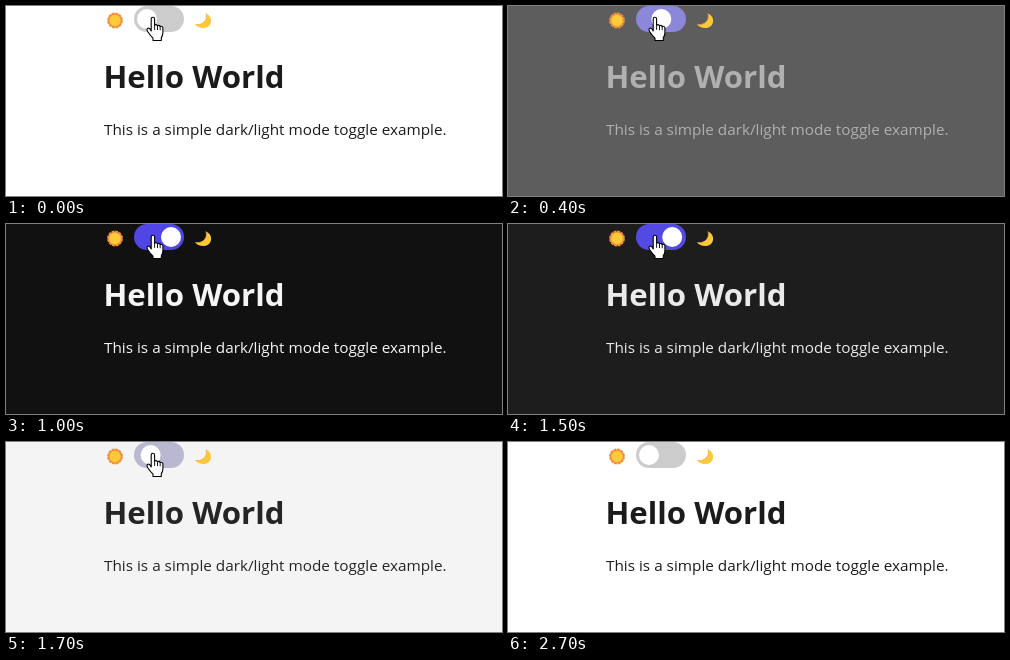
An HTML page that plays this animation: 496 by 190 pixels, repeating every 2800 ms.

```html
<!DOCTYPE html>
<html lang="en">
<head>
<meta charset="utf-8">
<title>Dark/light toggle</title>
<style>
  html, body { margin: 0; width: 100%; height: 100%; overflow: hidden; }
  svg { display: block; font-family: "Open Sans", "Noto Sans", sans-serif; }
</style>
</head>
<body>
<svg id="stage" width="496" height="190" viewBox="0 0 496 190">
  <rect id="page" width="496" height="190"/>

  <g transform="translate(109 14.5)">
    <circle r="7.1" fill="#f0903f"/>
    <circle r="7" fill="none" stroke="#f0903f" stroke-width="1.8" stroke-dasharray="2.9 .765"/>
    <circle r="5.7" fill="#fdcb3a"/>
  </g>

  <rect id="track" x="128" width="50" height="26" rx="13"/>
  <circle id="knob" cy="13" r="10" fill="#fff"/>

  <path d="M200 7.5C206.5 10 206.5 18 202 20.8C198 23.2 191.5 22 189.3 18.6C197 19.5 202 14 200 7.5Z" fill="#fdc83a"/>
  <path d="M189.3 18.6C197 19.5 202 14 200 7.5" fill="none" stroke="#f3a33c" stroke-width=".7"/>

  <g id="copy">
    <text x="97.5" y="82" font-size="31.2" font-weight="700">Hello World</text>
    <text x="98" y="129" font-size="15.3">This is a simple dark/light mode toggle example.</text>
  </g>

  <g id="hand" stroke="#000" stroke-linecap="round" stroke-linejoin="round">
    <path fill="#fff" stroke-width="1.1" d="M145.2 25V13a1.7 1.7 0 0 1 3.4 0v6.2q1.5-1.4 2.9.5q1.6-1 2.7.7q2.7-.5 2.7 1.8v4.5q0 3-1.6 5v2.8h-8.3v-2.3q-3-3-5.2-6.5q-2-3.5.8-3.7q1.2 0 2.6 3z"/>
    <path fill="none" stroke-width=".9" d="M148.6 19v4.5M151.5 19.7v4M154.2 20.4v3.5"/>
  </g>
</svg>
<script>
const LOOP = 2800, STEP = 100;
const TO_DARK = 280, TO_LIGHT = 1480, HAND_LEAVES = 2500;
const PAGE_MS = 300, SWITCH_MS = 400;
const [page, track, knob, copy, hand] =
  ['page', 'track', 'knob', 'copy', 'hand'].map(id => document.getElementById(id));

// CSS "ease": cubic-bezier(.25, .1, .25, 1)
function ease(x) {
  if (x <= 0 || x >= 1) return x <= 0 ? 0 : 1;
  const bezier = (a, b, s) => 3 * a * s * (1 - s) ** 2 + 3 * b * s * s * (1 - s) + s ** 3;
  let low = 0, high = 1;
  for (let i = 0; i < 24; i++) {
    const mid = (low + high) / 2;
    if (bezier(.25, .25, mid) < x) low = mid; else high = mid;
  }
  return bezier(.1, 1, low);
}

const darkness = (t, duration) =>
  ease((t - TO_DARK) / duration) - ease((t - TO_LIGHT) / duration);

const mix = (from, to, k) =>
  `rgb(${from.map((c, i) => Math.round(c + (to[i] - c) * k))})`;
const gray = v => [v, v, v];

function draw(t) {
  const dark = darkness(t, PAGE_MS), on = darkness(t, SWITCH_MS);
  page.setAttribute('fill', mix(gray(255), gray(17), dark));
  copy.setAttribute('fill', mix(gray(27), gray(245), dark));
  track.setAttribute('fill', mix(gray(204), [79, 70, 229], on));
  knob.setAttribute('cx', 141 + 24 * on);
  hand.setAttribute('visibility', t < HAND_LEAVES ? 'visible' : 'hidden');
}

function tick() {
  draw(Math.floor(performance.now() / STEP + .05) * STEP % LOOP);
  requestAnimationFrame(tick);
}
tick();
</script>
</body>
</html>
```
